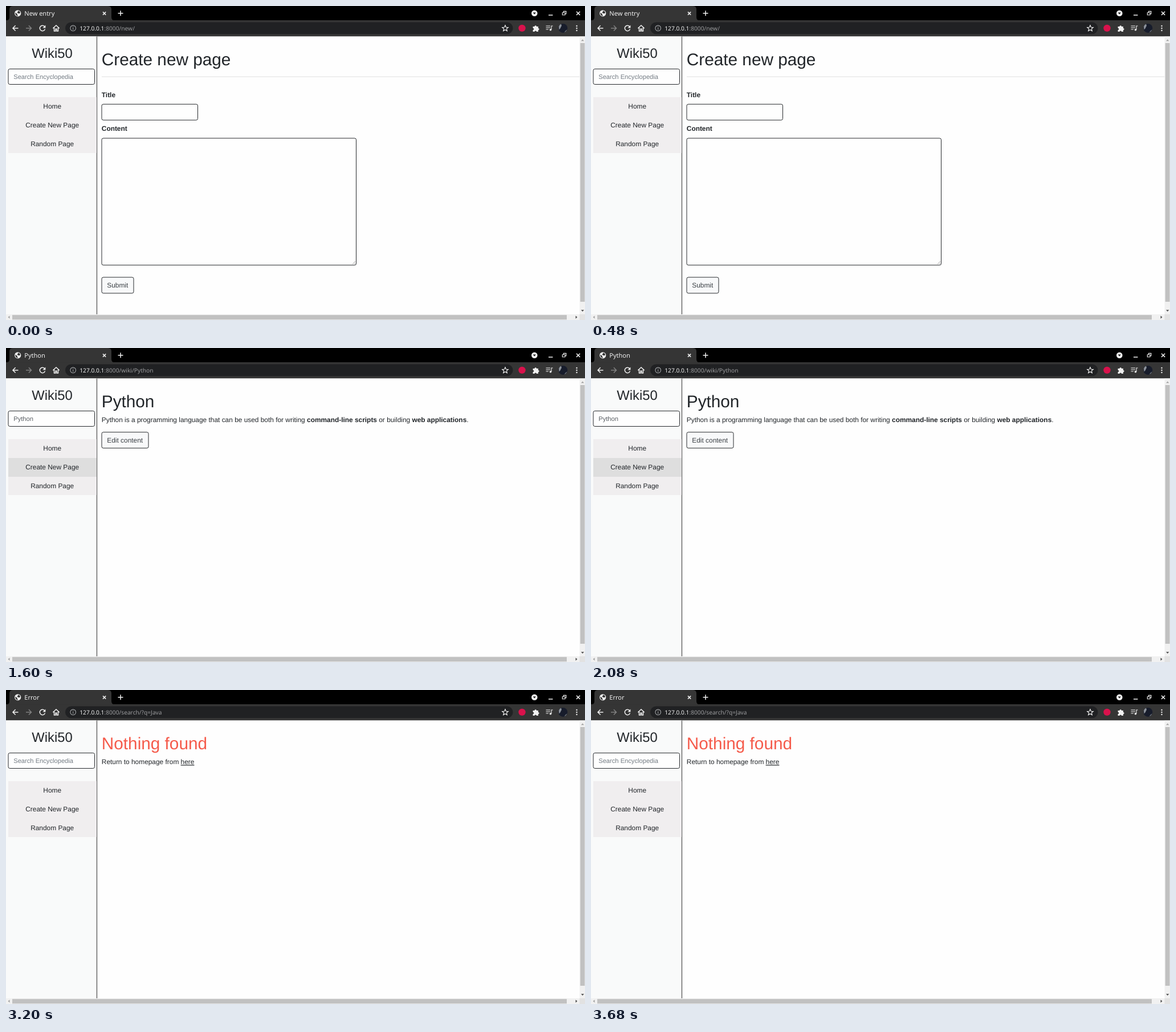
Animation, 1016 px wide and 551 px high, one loop 4000 ms. Source, as an HTML page:

```html
<!DOCTYPE html>
<html lang="en">
<head>
<meta charset="utf-8">
<title>Wiki pages</title>
<style>
  html, body { margin: 0; width: 100%; height: 100%; overflow: hidden; background: #fefefe; }
  svg { display: block; width: 1016px; height: 551px; }
  text { font: 11.9px "Liberation Sans", Arial, sans-serif; fill: #212529; text-rendering: geometricPrecision; white-space: pre; }
  .h1 { font-size: 29.76px; }
  .h2 { font-size: 23.8px; }
  .bold { font-weight: bold; }
  .mid { text-anchor: middle; }
  .field { font-size: 11.16px; }
  .hint { fill: #737b83; }
  .typed { fill: #5a5f64; }
  .soft { fill: #495057; }
  .link { fill: #50555a; }
  .btn { fill: #3a3f44; }
  .error { fill: #f55b4b; }
  .tab { font: 11px "Noto Sans", "Open Sans", sans-serif; fill: #f1f1f1; }
  .url { font: 10.2px "Noto Sans", "Open Sans", sans-serif; fill: #9a9b9d; }
  .host { fill: #f0f0f0; }
  .box { fill: #fefefe; stroke: #26292c; }
  .icon { fill: none; stroke: #f1f1f1; stroke-width: 1.5; }
  .thin { stroke-width: 1.1; }
  .dim { stroke: #808080; }
  .solid { fill: #f1f1f1; }
</style>
</head>
<body>
<svg viewBox="0 0 1016 551" xmlns="http://www.w3.org/2000/svg">
  <!-- window frame -->
  <rect width="1016" height="26" fill="#000"/>
  <rect y="25" width="1016" height="28.5" fill="#353535"/>
  <path d="M0 25.500Q6 25.500 6 19.500V6Q6 0 12 0H179Q185 0 185 6V19.500Q185 25.500 191 25.500Z" fill="#353535"/>
  <rect x="104" y="28.500" width="785.500" height="20.800" rx="10.400" fill="#202123"/>

  <!-- tab strip icons -->
  <circle class="solid" cx="20.700" cy="12.800" r="5.600"/>
  <path d="M16.300 11.500l3.400 2.600v1.400l1 1v1.200q-4.600-1-4.400-6.200zM21.500 8.300l2.600 1.200 1 2.600-1.600 1.200-2.500-.6-1.700-1.600 1.600-1z" fill="#353535"/>
  <path class="icon" d="M170 10.400l5.200 5.200m0-5.200l-5.200 5.200"/>
  <path class="icon" d="M196.500 12.800h9m-4.500-4.500v9"/>
  <circle class="solid" cx="927.300" cy="12.800" r="5.300"/>
  <path d="M924.800 11.500h5l-2.500 3z"/>
  <path class="icon" d="M952 16h7.500"/>
  <path class="icon thin" d="M976.300 11.700h4.700v4h-4.700zM978.300 11.500V9.400h4.600v4.400h-1.800"/>
  <path class="icon" d="M1001 9.700l6.200 6.200m0-6.200l-6.200 6.200"/>

  <!-- toolbar icons -->
  <path class="icon" d="M21.500 38.900H12m4.600-4.600L12 38.900l4.600 4.600"/>
  <path class="icon dim" d="M35 38.900h9.500m-4.600-4.600l4.600 4.600-4.600 4.600"/>
  <path class="icon" d="M67.600 36a4.700 4.700 0 1 0 .9 4.400"/>
  <path class="solid" d="M69.400 33.500v4.900h-4.900z"/>
  <path class="icon" d="M82.300 39.200l5.700-5.200 5.700 5.200M84.500 38v5.900h2.500v-3.700h2v3.700h2.500V38" stroke-width="1.300"/>
  <circle class="icon thin" cx="117.700" cy="38.900" r="4.800" style="stroke:#a2a4a7"/>
  <path class="icon thin" d="M117.700 36v1.300m0 .9v3.500" style="stroke:#a2a4a7"/>
  <path id="star" class="icon thin"/>
  <circle cx="905.500" cy="38.900" r="6.200" fill="#d9124c"/>
  <path class="solid" d="M924.600 35.900h2.900a1.700 1.700 0 1 1 3.400 0h3v3a1.700 1.700 0 1 1 0 3.400v2.800h-3a1.700 1.700 0 0 0-3.400 0h-2.900v-3a1.700 1.700 0 0 0 0-3.400z"/>
  <path class="icon thin" d="M947.500 35h7.500m-7.500 3h7.500m-7.500 3h4.500M957 41.500V35h2.500"/>
  <circle class="solid" cx="955.500" cy="41.800" r="1.800"/>
  <circle cx="977.300" cy="38.900" r="8" fill="#171c2b"/>
  <path d="M970 36a8 8 0 0 1 4-4.400l1 3-2.500 5-2 2zM981 44.500l3.500-3.200a8 8 0 0 1-4.500 5.100z" fill="#8d939b"/>
  <g class="solid"><circle cx="1001.500" cy="35" r="1.200"/><circle cx="1001.500" cy="39" r="1.200"/><circle cx="1001.500" cy="43" r="1.200"/></g>

  <!-- page -->
  <rect y="53.500" width="1016" height="497.500" fill="#fefefe"/>
  <rect y="53.500" width="159" height="487.500" fill="#f9fafa"/>
  <rect x="158.700" y="53.500" width="1.500" height="487.500" fill="#686868"/>
  <text class="h2 mid" x="81" y="91.200">Wiki50</text>
  <rect class="box" x="4" y="110.500" width="151.500" height="27" rx="2.800"/>
  <g id="scene"></g>

  <!-- scrollbars -->
  <path d="M1006.500 53.500h9.500V551H0v-10h1006.500z" fill="#f1f1f1"/>
  <rect x="1006.500" y="541" width="9.500" height="10" fill="#e2e2e2"/>
  <path d="M1007.700 65h7.800v454h-7.800zM11 542.200h973v8H11z" fill="#c1c1c1"/>
  <path d="M1009 61.500h5.400l-2.700-3zM6.500 543.400v5.400l-3-2.700z" fill="#a3a3a3"/>
  <path d="M1009 533.300h5.400l-2.700 3zM999.500 543.400v5.400l3-2.700z" fill="#505050"/>
</svg>
<script>
const STEP = 800;
const HINT = "Search Encyclopedia";

const text = (x, y, s, cls = "") => `<text x="${x}" y="${y}" class="${cls}">${s}</text>`;
const span = (cls, s) => `<tspan class="${cls}">${s}</tspan>`;
const rect = (x, y, w, h, attrs) => `<rect x="${x}" y="${y}" width="${w}" height="${h}" ${attrs}/>`;
const box = (y, w, h, fill = "#fefefe") =>
  rect(168, y, w, h, `rx="2.800" class="box" style="fill:${fill}"`);
const heading = (s, cls = "") => text(167.8, 104, s, "h1 " + cls);
const para = s => text(167.8, 130.3, s);
const rule = rect(168, 123.6, 838.5, 0.9, 'fill="#dcdcdc"');
const button = (y, w, s) => box(y, w, 28, "#f8f9fa") + text(177.3, y + 17.9, s, "btn");
const area = y => box(y, 446.5, 222.7) +
  `<path d="M608 ${y + 221}l5-5m-2 5l2-2" stroke="#888" stroke-width=".8"/>`;

function menu(hover) {
  return ["Home", "Create New Page", "Random Page"].map((s, i) => {
    const y = 160 + i * 32.75;
    return rect(4, y, 154.7, 32.75, `fill="${i === hover ? "#dedede" : "#f0eeef"}" shape-rendering="crispEdges"`) +
      text(81.2, y + 20.3, s, "mid");
  }).join("");
}

const scenes = [
  {
    tab: "New entry", path: "new/",
    body: heading("Create new page") + rule +
      text(167.8, 159.5, "Title", "bold") + box(172.3, 168.5, 27.9) +
      text(167.8, 219, "Content", "bold") + area(232) + button(476, 56, "Submit")
  },
  {
    tab: "Django", path: "wiki/", hover: 2,
    body: heading("Django") +
      para(`Django is a web framework written using ${span("link", "Python")} that allows for the design of web applications that generate ${span("link", "HTML")} dynamically.`) +
      button(147.7, 82, "Edit content")
  },
  {
    tab: "Python", path: "wiki/Python", hover: 1, query: "Python",
    body: heading("Python") +
      para(`Python is a programming language that can be used both for writing ${span("bold", "command-line scripts")} or building ${span("bold", "web applications")}.`) +
      button(147.7, 82, "Edit content")
  },
  {
    tab: "Edit - Python", path: "edit/Python",
    body: heading("Edit - Python") + rule + area(147.2) +
      text(177.3, 164.3, "# Python", "soft") +
      text(177.3, 200.2, "Python is a programming language that can be used both for writing **command-", "soft") +
      text(177.3, 218, "line scripts** or building **web applications**.", "soft") +
      button(385.2, 56, "Submit")
  },
  {
    tab: "Error", path: "search/?q=Java",
    body: heading("Nothing found", "error") +
      para('Return to homepage from <tspan text-decoration="underline">here</tspan>')
  }
];

const render = s =>
  text(32.3, 16.8, s.tab, "tab") +
  text(129.3, 42.5, span("host", "127.0.0.1") + ":8000/" + s.path, "url") +
  text(13.2, 128.3, s.query || HINT, "field " + (s.query ? "typed" : "hint")) +
  menu(s.hover) + s.body;

const star = Array.from({ length: 10 }, (_, i) => {
  const a = (i / 5 - 0.5) * Math.PI, r = i % 2 ? 2.5 : 5.6;
  return `${(876 + r * Math.cos(a)).toFixed(2)} ${(39.2 + r * Math.sin(a)).toFixed(2)}`;
});
document.getElementById("star").setAttribute("d", "M" + star.join("L") + "Z");

const stage = document.getElementById("scene");
const start = performance.now();
let shown = -1;

function draw(now) {
  const i = Math.floor(Math.max(0, now - start) / STEP) % scenes.length;
  if (i !== shown) stage.innerHTML = render(scenes[shown = i]);
  requestAnimationFrame(draw);
}
draw(start);
</script>
</body>
</html>
```
